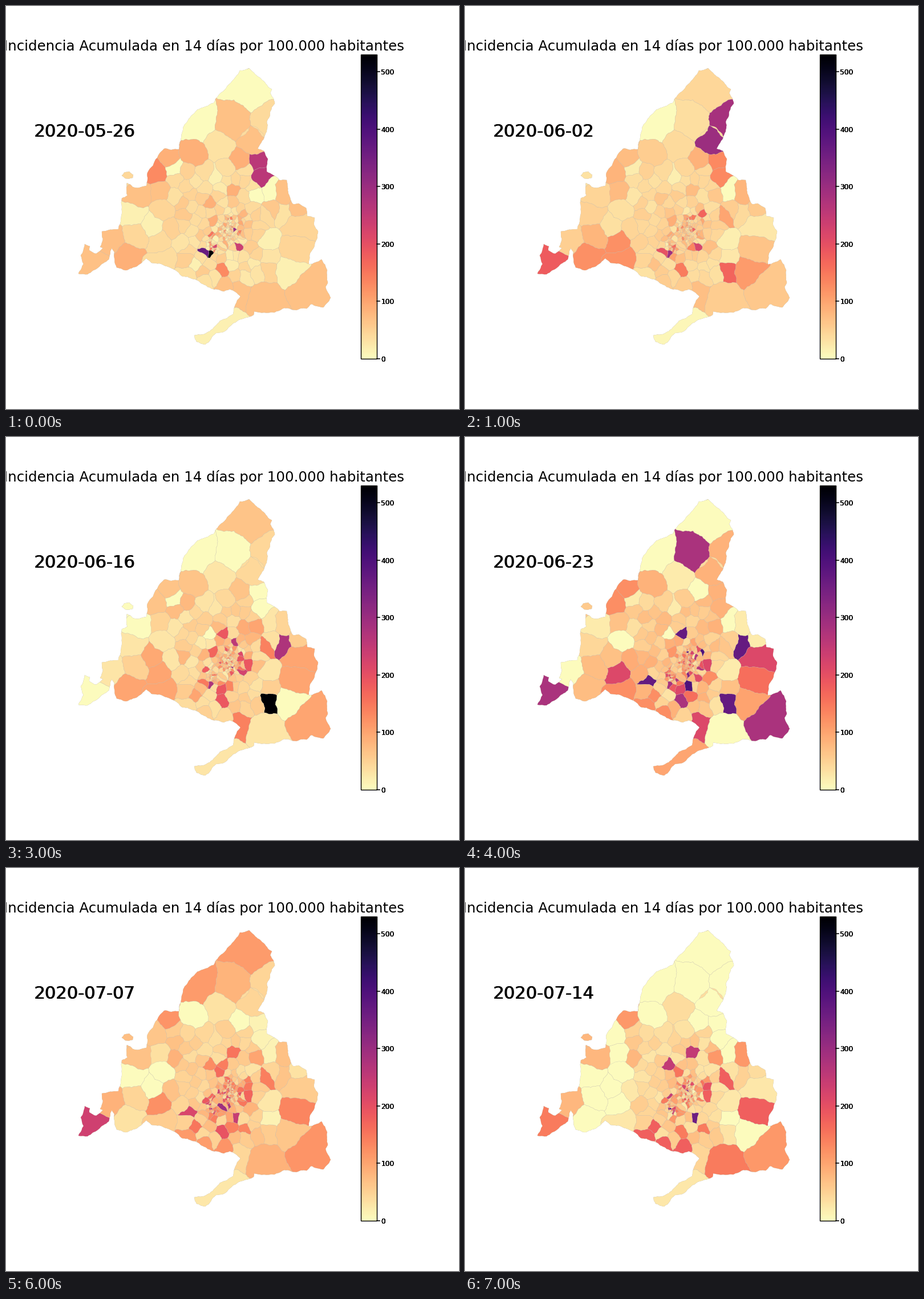
A matplotlib script that plays this animation: 794 by 706 pixels, repeating every 8 s.

```python
import math
import random

import matplotlib.pyplot as plt
import numpy as np
from matplotlib.animation import FuncAnimation
from matplotlib.collections import PolyCollection
from matplotlib.patches import PathPatch, Rectangle
from matplotlib.path import Path

W, H, DPI = 794, 706, 64
PX = 72 / DPI  # points per pixel
VMAX = 530
WEEKS = 8
FIRST_DAY = np.datetime64("2020-05-26")

rng = random.Random(14)

# Outline of the region, clockwise from the top
EAST = [(426, 109), (437, 120), (453, 133), (466, 146), (463, 153), (471, 171),
        (463, 185), (457, 203), (458, 214), (449, 236), (441, 250), (452, 254),
        (459, 268), (457, 290), (468, 296), (479, 305), (492, 305), (495, 329),
        (503, 347), (513, 346), (526, 354), (528, 368), (541, 371), (540, 384),
        (547, 395), (541, 417), (533, 433), (531, 453), (553, 444), (563, 463),
        (564, 485), (560, 492), (569, 511), (556, 528), (535, 522), (527, 530),
        (488, 529), (470, 537), (435, 535)]
WEST = [(434, 541), (405, 552), (381, 571), (368, 573), (349, 593), (334, 588),
        (330, 577), (357, 570), (398, 540), (411, 509), (392, 496), (382, 500),
        (345, 487), (308, 473), (282, 456), (255, 450), (246, 442), (210, 463),
        (194, 458), (190, 431), (185, 424), (180, 444), (143, 470), (127, 469),
        (136, 452), (131, 437), (138, 417), (147, 421), (146, 428), (158, 434),
        (170, 424), (165, 422), (170, 408), (168, 395), (197, 391), (202, 368),
        (203, 337), (213, 332), (212, 310), (222, 317), (246, 315), (248, 292),
        (265, 266), (277, 250), (303, 251), (312, 210), (335, 182), (364, 170),
        (380, 150), (402, 125), (410, 113)]
ISLAND = [(203, 297), (207, 292), (216, 290), (223, 296), (222, 301), (209, 302)]

# Centres of the larger zones; "n0" is the first northern one
CENTRES = {
    "n": [(425, 152), (333, 212), (400, 208), (458, 208), (433, 238), (411, 275),
          (374, 250), (328, 265), (443, 275), (443, 303), (436, 330), (463, 325),
          (487, 330), (368, 300), (397, 320), (356, 345), (381, 347)],
    "e": [(513, 356), (484, 362), (507, 383), (503, 425), (495, 460), (455, 461),
          (527, 492), (451, 505), (455, 410), (457, 440), (420, 458), (428, 424),
          (401, 437), (453, 368), (466, 357), (422, 372), (424, 397)],
    "s": [(380, 556), (408, 494), (383, 487), (350, 480), (320, 470), (332, 452),
          (379, 462), (395, 453), (376, 440), (360, 432), (321, 427), (378, 418)],
    "w": [(155, 445), (185, 408), (217, 438), (278, 440), (270, 411), (229, 400),
          (224, 366), (234, 326), (272, 326), (265, 292), (284, 266), (296, 286),
          (300, 303), (297, 335), (279, 356), (293, 390), (256, 385), (212, 290)],
}

# Key weeks: typical rate in towns and city, and zones that stand out
KEYS = [
    (0, 40, 48, {
        3: "n0 n1 n10 n11 w11", 15: "w6 w16 s0 s5 n13 e4 e8",
        70: "w0 w7 w8 e0 e6 n2 n12 s1 s2", 88: "w2 w10 n5 n7 n14 n15",
        130: "w9 s6", 260: "n8 n9", 530: "s9"}),
    (2, 50, 75, {
        3: "n1 n2 n8 n9 n11 n15 e2 s0", 22: "n7 n13 w7 w13 w14 w17 e8 e9",
        85: "n0 n5 w6 e3 e11 e12", 120: "n10 s5 w5", 160: "w2 e13 s6",
        205: "w3 w4 e4", 295: "w0 e5", 530: "n3 n4"}),
    (3, 48, 70, {
        3: "n1 n2 n8 n9 n15 w0 w7 w11 w17 e4",
        28: "n6 n11 n13 w1 w6 w13 w14 w15 s0 e7 e8", 65: "n0 n5 n7 w9 w10",
        100: "n10 w2 w3 w4 e2 e3 e6 s5", 140: "s1 e13",
        190: "n16 s6 s8 e16", 275: "e1 s9", 530: "e5"}),
    (4, 62, 112, {
        3: "n0 n1 n5 n11 n15 w1 w14 e7", 22: "n6 n12 n13 w7 w11 e0 e8",
        85: "n3 n4 n7 n8 n9 n10 e10", 125: "w3 w9 w10 s3 s4 s5 e11",
        160: "e3 s7", 215: "w4 e2 e16 s1 s8", 280: "n2 w0 e6 s6 s9",
        370: "n16 e1 e5 s10"}),
    (5, 55, 108, {
        3: "n5 n7 n15 w6 w14 w16", 25: "n6 n8 n9 n11 n12 n13 e0 e7 e8 e9 s0",
        90: "n3 n4 w1 w5 w13 e2 e3", 125: "w9 w10 e4 e6 e10 e11 e12 s5",
        165: "n2 e15 e16", 220: "n0 n1 n16", 245: "w4 s6 s7 s9",
        320: "w0", 390: "s10", 530: "s11"}),
    (7, 45, 82, {
        3: "n0 n1 n2 n3 n4 n5 n7 n8 n9 n11 w2 w4 w5 w6 w8 w9 w14 w16 e4 e9",
        25: "w3 w15 e2 e8 s0", 80: "w1 w7 w13 w17", 115: "n10 w10 e6 e15",
        145: "w0 e7 e10 s6", 180: "e3 e13 e16 s2 s3 s4 s5",
        250: "n14 n15", 360: "e12"}),
]


def split(a, b, gen, amp):
    """Ragged line from a to b, without b."""
    size = math.dist(a, b)
    if size < 4.5:
        return [a]
    k = gen.uniform(-amp, amp)
    mid = ((a[0] + b[0]) / 2 - k * (b[1] - a[1]),
           (a[1] + b[1]) / 2 + k * (b[0] - a[0]))
    return split(a, mid, gen, amp) + split(mid, b, gen, amp)


def edge(a, b, amp):
    """Same ragged line for both neighbours of a border."""
    lo, hi = sorted((a, b))
    line = split(lo, hi, random.Random(f"{lo}{hi}"), amp) + [hi]
    return line[:-1] if lo == a else line[:0:-1]


def ragged(pts, amp):
    return [p for a, b in zip(pts, pts[1:] + pts[:1]) for p in edge(a, b, amp)]


def nearer(poly, p, q):
    """Part of poly that lies closer to p than to q."""
    nx, ny = q[0] - p[0], q[1] - p[1]
    c = (nx * (p[0] + q[0]) + ny * (p[1] + q[1])) / 2
    out = []
    for a, b in zip(poly, poly[1:] + poly[:1]):
        da, db = nx * a[0] + ny * a[1] - c, nx * b[0] + ny * b[1] - c
        if da <= 0:
            out.append(a)
        if da * db < 0:
            t = da / (da - db)
            out.append((a[0] + t * (b[0] - a[0]), a[1] + t * (b[1] - a[1])))
    return out


def cell(p, seeds):
    poly = [(100, 90), (600, 90), (600, 610), (100, 610)]
    for q in sorted(seeds, key=lambda s: math.dist(s, p))[1:80]:
        poly = nearer(poly, p, q)
    return ragged([(round(x, 1), round(y, 1)) for x, y in poly], 0.13)


def scatter(seeds, tries, gap, point):
    """Add random points that keep a gap to the ones already there."""
    fixed = list(seeds)
    for _ in range(tries):
        p = point()
        if min(math.dist(p, s) for s in fixed) > gap:
            seeds.append(p)
            if gap > 10:
                fixed.append(p)


names = [f"{side}{i}" for side, pts in CENTRES.items() for i in range(len(pts))]
seeds = [p for pts in CENTRES.values() for p in pts]
scatter(seeds, 500, 14, lambda: (rng.uniform(308, 442), rng.uniform(288, 478)))
towns = len(seeds)
scatter(seeds, 120, 5, lambda: (rng.gauss(392, 12), rng.gauss(393, 13)))
scatter(seeds, 30, 5, lambda: (rng.gauss(363, 9), rng.gauss(421, 9)))
shapes = [cell(p, seeds) for p in seeds]


def key_rates(town, city, special):
    """Rates of all zones in one key week."""
    out = [min(400, town * math.exp(rng.gauss(0, 0.3)) if i < towns
               else city * math.exp(rng.gauss(0, 0.6)))
           for i in range(len(seeds))]
    for rate, zones in special.items():
        for name in zones.split():
            out[names.index(name)] = rate
    return out


key_weeks = [k[0] for k in KEYS]
key_table = np.array([key_rates(*k[1:]) for k in KEYS])
rates = np.array([np.interp(range(WEEKS), key_weeks, zone)
                  for zone in key_table.T])

plt.rcParams["font.family"] = "DejaVu Sans"
fig = plt.figure(figsize=(W / DPI, H / DPI), dpi=DPI, facecolor="white")
ax = fig.add_axes([0, 0, 1, 1])
ax.axis("off")

# colour bar
ramp = np.linspace(0, 1, 256)[:, None]
ax.imshow(ramp, cmap="magma_r", extent=(622, 650, 618, 85), origin="lower",
          aspect="auto", interpolation="nearest")
ax.add_patch(Rectangle((622, 85), 28, 533, fill=False, ec="black", lw=1.4 * PX))
for n in range(0, 600, 100):
    y = 618 - n * 533 / VMAX
    ax.plot([650, 654.5], [y, y], color="black", lw=1.6 * PX)
    for _ in range(4):  # stacked for heavy digits
        ax.text(657.3, y, str(n), size=12.25 * PX, va="center_baseline")
ax.set_xlim(0, W)
ax.set_ylim(H, 0)

ax.text(-3.5, 78, "Incidencia Acumulada en 14 días por 100.000 habitantes",
        size=24.5 * PX, va="baseline")
dates = [ax.text(x, 229, "", size=30.6 * PX, va="baseline") for x in (48.5, 49.5)]

# map
border = Path.make_compound_path(
    *[Path(s + s[:1], closed=True)
      for s in (ragged(EAST + WEST, 0.09), ragged(ISLAND, 0.09))])
ax.add_patch(PathPatch(border, fc="#fddc9e", ec="0.7", lw=0.4 * PX))
zones = PolyCollection(shapes, cmap="magma_r", edgecolors="0.72",
                       linewidths=0.25 * PX)
zones.set_clim(0, VMAX)
ax.add_collection(zones, autolim=False)
zones.set_clip_path(border, ax.transData)


def draw(week):
    zones.set_array(rates[:, week])
    for text in dates:
        text.set_text(str(FIRST_DAY + 7 * week))
    return [zones, *dates]


anim = FuncAnimation(fig, draw, frames=WEEKS, interval=1000,
                     repeat=True, repeat_delay=0)
plt.show()
```
